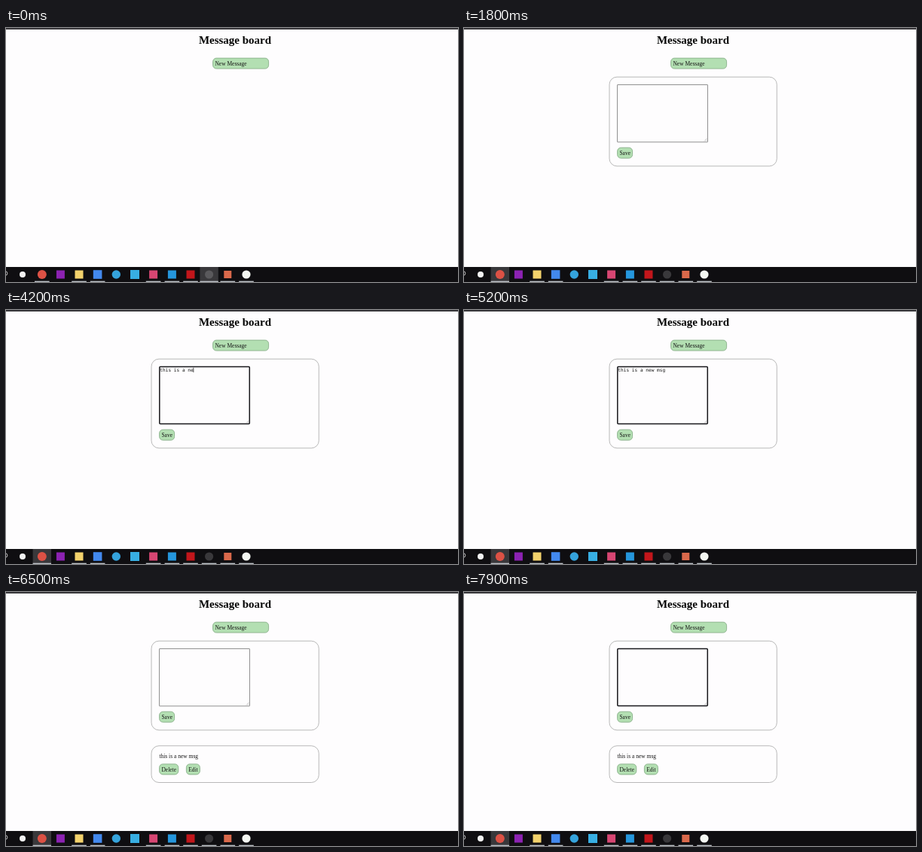
Animation of 600 by 338 pixels, one loop 8 s. Source, as an HTML page with a canvas:

```html
<!DOCTYPE html>
<html lang="en">
<head>
<meta charset="utf-8">
<title>Message board</title>
<style>
html, body { margin: 0; width: 100%; height: 100%; overflow: hidden; background: #fefdfe; }
canvas { display: block; width: 600px; height: 338px; }
</style>
</head>
<body>
<canvas id="stage"></canvas>
<script>
const LOOP = 8000;
const SERIF = '"Liberation Serif", "Times New Roman", serif';
const MONO = '"DejaVu Sans Mono", monospace';
const GREEN = '#b3dfb2', PRESSED = '#b9b9b9';
const MESSAGE = 'this is a new msg';

// Time at which each character of MESSAGE is typed
const KEYS = [2800, 2900, 3000, 3100, 3300, 3700, 3800, 3900, 4000,
              4100, 4150, 4200, 4250, 4300, 4500, 4600, 4700];

const canvas = document.getElementById('stage');
const ratio = window.devicePixelRatio || 1;
canvas.width = 600 * ratio;
canvas.height = 338 * ratio;
const ctx = canvas.getContext('2d');
ctx.scale(ratio, ratio);

const between = (t, start, end) => t >= start && t < end;

function rect(x, y, w, h, color) {
  ctx.fillStyle = color;
  ctx.fillRect(x, y, w, h);
}

function rounded(x, y, w, h, radius, stroke, fill, line = 0.8) {
  ctx.beginPath();
  ctx.roundRect(x, y, w, h, radius);
  if (fill) {
    ctx.fillStyle = fill;
    ctx.fill();
  }
  if (stroke) {
    ctx.strokeStyle = stroke;
    ctx.lineWidth = line;
    ctx.stroke();
  }
}

function circle(x, y, radius, color) {
  ctx.beginPath();
  ctx.arc(x, y, radius, 0, Math.PI * 2);
  ctx.fillStyle = color;
  ctx.fill();
}

function text(label, x, y, font, color = '#161616') {
  ctx.font = font;
  ctx.fillStyle = color;
  ctx.fillText(label, x, y);
}

function button(label, x, y, w, pressed) {
  rounded(x, y, w, 14, 4.7, pressed ? '#777777' : '#7fa781', pressed ? PRESSED : GREEN);
  text(label, x + 2.8, y + 9.6, `7.5px ${SERIF}`);
}

function panel(y, h) {
  rounded(193, y, 222.3, h, 10, '#a8a8a8', null);
}

function textarea(content, focused, caret) {
  if (focused) rounded(203.8, 75.6, 119.5, 76, 1, '#17171b', '#fefdfe', 1.5);
  else rounded(203.5, 75.5, 120, 76.3, 0.4, '#858585', '#fefdfe', 0.9);

  ctx.beginPath();
  ctx.moveTo(319, 150.5);
  ctx.lineTo(322.5, 147);
  ctx.moveTo(321, 150.5);
  ctx.lineTo(322.5, 149);
  ctx.strokeStyle = '#888888';
  ctx.lineWidth = 0.5;
  ctx.stroke();

  const font = `6.15px ${MONO}`;
  text(content, 204.3, 82, font);
  if (caret) rect(204.3 + ctx.measureText(content).width - 0.2, 76.8, 0.8, 6.2, '#222222');
}

// [center x, shape, half size, color, is running]
const ICONS = [
  [22, 'circle', 4, '#f2f2f2', false],
  [47.8, 'circle', 6, '#dc5145', true],
  [72.4, 'square', 5.5, '#8c22b2', false],
  [97, 'square', 5.5, '#f3d26c', true],
  [121.6, 'square', 5.8, '#4389ee', true],
  [146.3, 'circle', 5.7, '#35a3dc', false],
  [171, 'square', 6, '#38aee2', false],
  [195.6, 'square', 5.5, '#d74673', true],
  [220.4, 'square', 5.5, '#2596dc', true],
  [245, 'square', 5.5, '#c2161b', true],
  [269.6, 'circle', 5.6, '#39383b', true],
  [294.3, 'square', 5, '#d9694b', true],
  [319, 'circle', 5.6, '#f4f7f2', true]
];

function taskbar(activeIndex) {
  rect(0, 318, 600, 20, '#0f0e11');

  ctx.beginPath();
  ctx.arc(-1, 326.5, 2.8, 0, Math.PI * 2);
  ctx.strokeStyle = '#dddddd';
  ctx.lineWidth = 0.9;
  ctx.stroke();

  ICONS.forEach(([x, shape, size, color, running], index) => {
    const active = index === activeIndex;
    if (active) rect(x - 12.2, 318, 24.4, 20, '#39383b');
    if (running) {
      const half = active ? 12.2 : 9.8;
      rect(x - half, 336.7, half * 2, 1.3, '#bfc4ca');
    }
    const fill = active && color === '#39383b' ? '#5a595c' : color;
    if (shape === 'circle') circle(x, 328, size, fill);
    else rect(x - size, 328 - size, size * 2, size * 2, fill);
  });
}

function draw(t) {
  rect(0, 0, 600, 338, '#fefdfe');
  rect(0, 0, 600, 2, '#39383c');

  ctx.textAlign = 'center';
  text('Message board', 304, 21, `bold 15px ${SERIF}`, '#050505');
  ctx.textAlign = 'left';
  button('New Message', 274.6, 40.1, 74, between(t, 1300, 1500));

  const saved = t >= 6300;
  if (t >= 1500) {
    const typed = KEYS.filter(time => time <= t).length;
    const focused = between(t, 2000, 6000) || t >= 7400;
    const lastInput = t >= 7400 ? 7400 : typed ? KEYS[typed - 1] : 2000;
    const caret = focused && (t - lastInput) % 1000 < 500;
    panel(65.2, 118.6);
    textarea(saved ? '' : MESSAGE.slice(0, typed), focused, caret);
    button('Save', 203.6, 159.2, 20, between(t, 6000, 6300));
  }
  if (saved) {
    panel(204.7, 48.8);
    text(MESSAGE, 203.4, 221.4, `7.5px ${SERIF}`);
    button('Delete', 203.6, 228.9, 25.2, false);
    button('Edit', 239.4, 228.9, 18, false);
  }
  taskbar(t < 1300 ? 10 : 1);
}

const start = performance.now();
function tick() {
  draw((performance.now() - start) % LOOP);
  requestAnimationFrame(tick);
}
tick();
</script>
</body>
</html>
```
